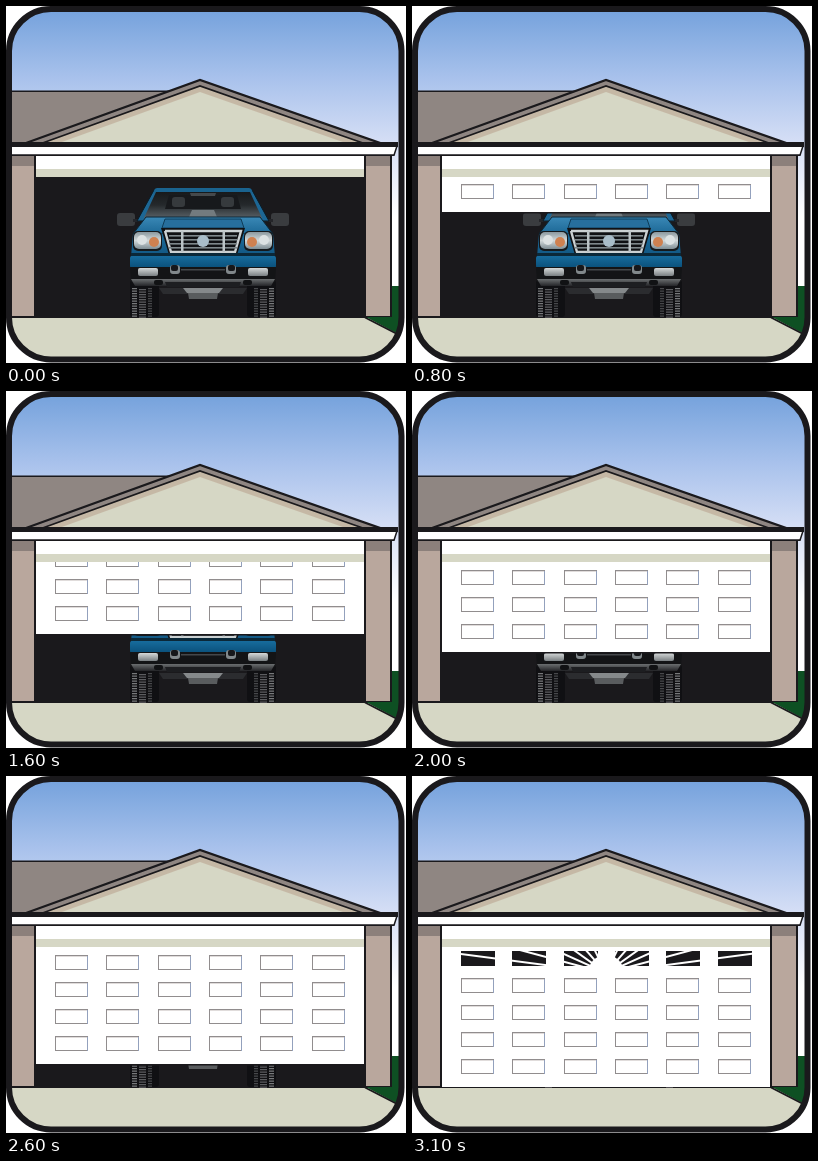
Write an HTML page with a canvas that moves like this. It is 400 px wide and 357 px high and loops after 3200 ms.

```html
<!DOCTYPE html>
<html lang="en">
<head>
<meta charset="utf-8">
<title>Garage door</title>
<style>
html, body { margin: 0; width: 100%; height: 100%; overflow: hidden; background: #fff; }
canvas { display: block; width: 400px; height: 357px; }
</style>
</head>
<body>
<canvas id="stage" width="400" height="357"></canvas>
<script>
const ctx = document.getElementById('stage').getContext('2d');
const INK = '#1a191c', CREAM = '#d6d7c5', ROOF = '#8f8682', WALL = '#b9a79d';
const LOOP = 3200, STEP = 100, MID = 197;
const DOOR = { x: 30, y: 171, w: 328, h: 140, speed: 4.565 };
const PANEL = { w: 33, h: 15, dx: 51.3, dy: 27, columns: 6, rows: 4 };

function rect(x, y, w, h, fill) {
  ctx.fillStyle = fill;
  ctx.fillRect(x, y, w, h);
}

function poly(points, fill, stroke, width = 1) {
  ctx.beginPath();
  for (const [x, y] of points) ctx.lineTo(x, y);
  if (fill) {
    ctx.closePath();
    ctx.fillStyle = fill;
    ctx.fill();
  }
  if (stroke) {
    ctx.strokeStyle = stroke;
    ctx.lineWidth = width;
    ctx.stroke();
  }
}

function round(x, y, w, h, r, fill) {
  ctx.beginPath();
  ctx.roundRect(x, y, w, h, r);
  ctx.fillStyle = fill;
  ctx.fill();
}

function disc(x, y, r, fill) {
  ctx.beginPath();
  ctx.arc(x, y, r, 0, 2 * Math.PI);
  ctx.fillStyle = fill;
  ctx.fill();
}

function fade(y0, y1, ...colors) {
  const g = ctx.createLinearGradient(0, y0, 0, y1);
  colors.forEach((c, i) => g.addColorStop(i / (colors.length - 1), c));
  return g;
}

// Symmetric trapezoid around the truck's centre line, given half widths
function trap(y0, half0, y1, half1, fill, stroke, width) {
  poly([[MID - half0, y0], [MID + half0, y0], [MID + half1, y1], [MID - half1, y1], [MID - half0, y0]],
    fill, stroke, width);
}

// Rounded box on both sides, its outer edge `far` from the centre line
function pair(far, y, w, h, r, fill) {
  round(MID - far, y, w, h, r, fill);
  round(MID + far - w, y, w, h, r, fill);
}

function gable(inset, fill, stroke, width) {
  const apex = 74 + inset, k = (137 - apex) / 63;
  poly([[194 - 174 * k, 137], [194, apex], [194 + 180 * k, 137]], fill, stroke, width);
}

function drawHouse() {
  rect(0, 0, 400, 280, fade(4, 280, '#75a2dc', '#a9c2ec', '#d9e1f6', '#fff', '#fff'));
  rect(0, 85, 164, 52, ROOF);
  rect(0, 84.5, 165, 1.5, INK);
  gable(0, ROOF, INK, 2.2);
  gable(6, '#c5b8a5', INK, 1.8);
  gable(12, CREAM);

  poly([[0, 140], [391, 140], [388, 149.3], [0, 149.3]], '#fff', INK, 1.5);
  rect(0, 136, 392, 5, INK);
  rect(0, 148.5, 388, 1.5, INK);

  for (const x of [4, 360]) {
    rect(x, 150, 25, 161, WALL);
    rect(x, 150, 25, 10, '#8c807b');
  }
  rect(28, 150, 332, 162, INK);
  rect(384, 150, 2, 161, INK);
  rect(DOOR.x, 150, DOOR.w, 14, '#fff');
  rect(DOOR.x, 163, DOOR.w, 8, CREAM);

  rect(0, 310, 386, 2, INK);
  rect(0, 312, 400, 45, CREAM);
  rect(386, 280, 14, 32, '#0e5023');
  poly([[360, 311], [400, 311], [400, 332]], '#0e5023');
  poly([[359, 311.5], [400, 332.5]], null, INK, 1.8);
}

function drawTires() {
  pair(73, 274, 29, 37, 3, '#101013');
  for (let y = 282; y < 310; y += 2.5) {
    pair(71, y, 5, 1.2, 0, '#77797b');
    pair(64, y + 1, 7, 1.2, 0, '#5c5d60');
    pair(55, y, 4, 1.2, 0, '#47484b');
  }
}

function drawCab() {
  pair(86, 207, 18, 13, 3, '#3a3c3f');
  pair(70, 213, 9, 3, 0, '#242529');
  trap(184, 49, 215, 66, '#1d6795', '#0a1a24');
  round(MID - 49, 182, 98, 7, 4, '#1a638f');
  trap(186, 47, 212, 59, fade(186, 212, '#17191b', '#25292c', '#596166'));
  trap(189, 34, 203, 38, '#17191c');
  pair(31, 191, 13, 10, 3, '#363a3d');
  trap(187, 13, 190, 12, '#45494c');
  trap(204, 11, 211, 14, '#737b7f');
}

function drawFront() {
  trap(211, 57, 228, 70, fade(211, 228, '#3a88b6', '#1b6795'), '#0b2534');
  trap(228, 70, 262, 73, fade(228, 262, '#1c6a99', '#0c4e78'));
  trap(213, 38, 222, 41, '#276f9d', '#0e3c58');

  // Headlights
  pair(70, 225, 29, 20, 5, '#15191c');
  pair(69, 226, 27, 17, 5, fade(226, 243, '#8b999f', '#d2d9da', '#7f8e95'));
  for (const side of [-1, 1]) {
    disc(MID + side * 61, 234, 5, '#dce2e3');
    disc(MID + side * 49, 236, 5, '#cf8150');
  }

  // Grille
  trap(222, 42, 249, 34, '#101114');
  trap(225, 38, 246, 32, null, '#cbd1d3', 2.4);
  for (let y = 229; y < 245; y += 4) rect(MID - 34, y, 68, 1.6, '#7f888c');
  pair(22, 225, 2.5, 21, 0, '#bcc4c7');
  disc(MID, 235, 6, '#a9bdc9');
}

function drawBumper() {
  rect(MID - 72, 247, 144, 3, '#0b2838');
  round(MID - 73, 250, 146, 11, 2, fade(250, 261, '#176c9d', '#0b527d'));
  trap(261, 73, 276, 72, '#131416');
  pair(65, 262, 20, 8, 2, fade(262, 270, '#d5d9d9', '#797f82'));
  pair(33, 259, 10, 9, 3, '#81888b');
  pair(32, 259, 7, 6, 2, '#16171a');
  rect(MID - 22, 263, 44, 1.5, '#44474a');
  trap(273, 72, 280, 68, fade(273, 280, '#6b6e70', '#242528'));
  trap(276, 38, 281, 36, '#1d1e21');
  pair(49, 274, 9, 5, 2, '#111214');
  trap(282, 44, 288, 40, '#2b2c2f');
  trap(282, 20, 287, 16, '#85898b');
  trap(287, 15, 293, 14, '#595c5e');
}

function drawTruck() {
  drawTires();
  drawCab();
  drawFront();
  drawBumper();
}

function panelX(column) {
  return Math.round(49 + column * PANEL.dx);
}

function drawWindows(top) {
  const cx = 194, cy = top + 22;
  ctx.save();
  ctx.beginPath();
  for (let i = 0; i < PANEL.columns; i++) ctx.rect(panelX(i), top, PANEL.w + 1, PANEL.h);
  ctx.clip();
  rect(DOOR.x, top, DOOR.w, PANEL.h, INK);
  for (let i = 0; i < 6; i++) {
    const a = (7.5 + 6.5 * i + 0.95 * i * i) * Math.PI / 180;
    for (const side of [-1, 1]) {
      poly([[cx, cy], [cx + side * 170 * Math.cos(a), cy - 170 * Math.sin(a)]], null, '#fff', 2);
    }
  }
  disc(cx, cy, 18, '#fff');
  ctx.restore();
}

function drawPanel(x, y) {
  ctx.lineWidth = 1;
  ctx.strokeStyle = '#918d8e';
  ctx.strokeRect(x + 0.5, y + 0.5, PANEL.w - 1, PANEL.h - 1);
  rect(x + PANEL.w - 1, y + 1, 1, PANEL.h - 1, '#93a1bd');
  rect(x + 1, y + 1, PANEL.w - 2, 1, '#e0dcdb');
}

function drawDoor(bottom) {
  ctx.save();
  ctx.beginPath();
  ctx.rect(DOOR.x, DOOR.y, DOOR.w, DOOR.h);
  ctx.clip();
  rect(DOOR.x, bottom - DOOR.h, DOOR.w, DOOR.h, '#fff');
  rect(DOOR.x, bottom, DOOR.w, 1.5, INK);
  for (let row = 0; row < PANEL.rows; row++) {
    for (let i = 0; i < PANEL.columns; i++) drawPanel(panelX(i), bottom - 28 - row * PANEL.dy);
  }
  drawWindows(bottom - 28 - PANEL.rows * PANEL.dy);
  ctx.restore();
}

function framePath() {
  ctx.beginPath();
  ctx.roundRect(3, 3, 392.5, 350.5, 42);
}

function render(ms) {
  const step = Math.floor((ms % LOOP) / STEP);
  ctx.clearRect(0, 0, 400, 357);
  ctx.save();
  framePath();
  ctx.clip();
  drawHouse();
  drawTruck();
  drawDoor(Math.round(169.5 + step * DOOR.speed));
  ctx.restore();
  framePath();
  ctx.lineWidth = 6;
  ctx.strokeStyle = INK;
  ctx.stroke();
}

const start = performance.now();
function tick() {
  render(performance.now() - start);
  requestAnimationFrame(tick);
}
tick();
</script>
</body>
</html>
```
